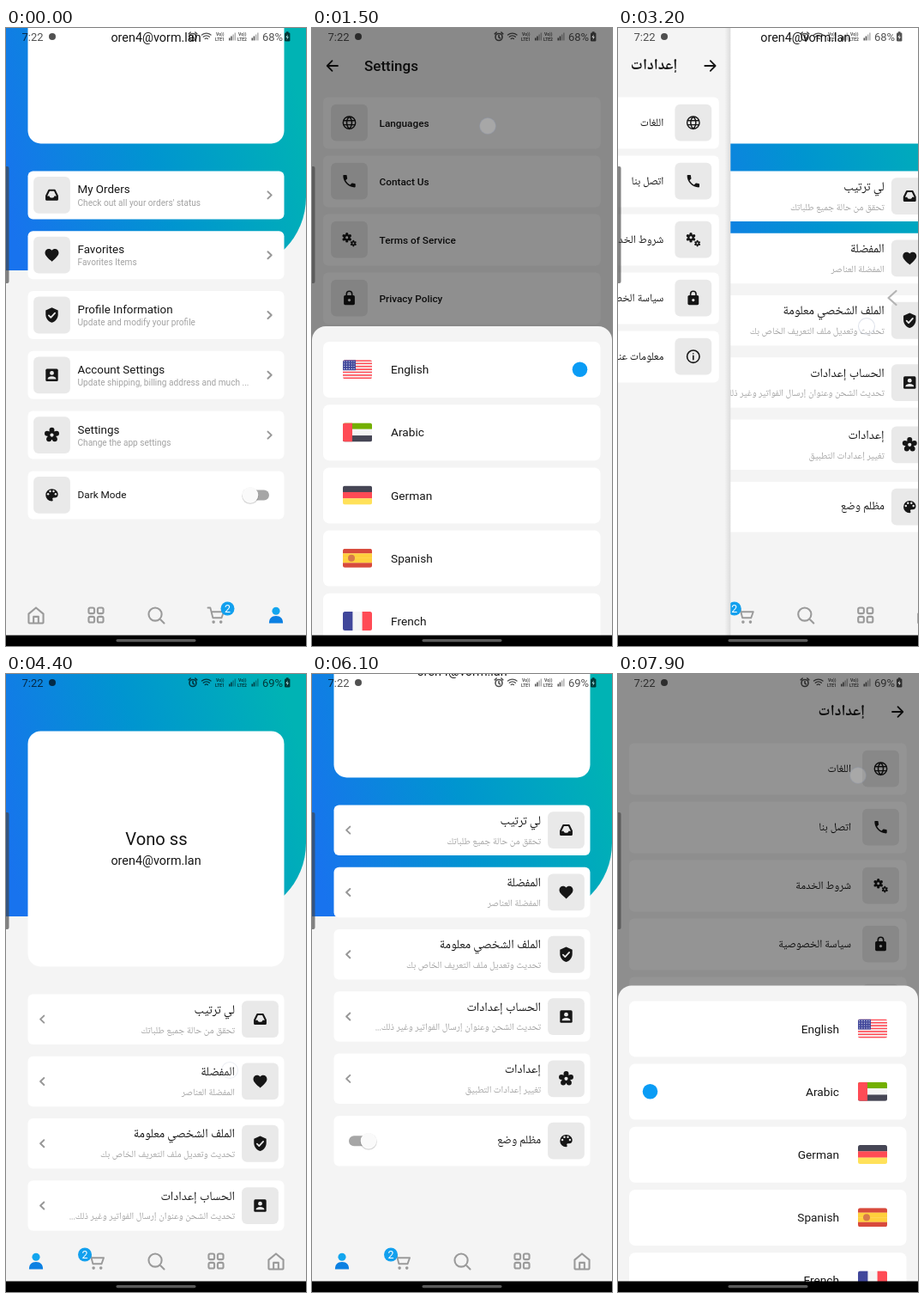
These frames come from a looping animation (350 by 719 pixels, 8 s). An HTML page:

```html
<!DOCTYPE html>
<html lang="en">
<head>
<meta charset="utf-8">
<title>Settings and language switch</title>
<style>
html, body { margin: 0; width: 100%; height: 100%; overflow: hidden; background: #f4f4f4; }
svg { display: block; width: 100%; height: 100%; }
text { font-family: Roboto, "Noto Sans", sans-serif; }
text.ar { font-family: "Noto Naskh Arabic UI", "Noto Naskh Arabic", "Noto Sans Arabic", "DejaVu Sans", sans-serif; direction: rtl; }
</style>
</head>
<body>
<svg id="stage" viewBox="0 0 350 719"></svg>
<script>
const LOOP = 8000, STEP = 100;
const BG = '#f4f4f4', TILE = '#e9e9e9', INK = '#161616', MUTED = '#a3a3a3', ACCENT = '#0a9cf5';

// ---------- drawing helpers ----------
const box = (x, y, w, h, r, fill, extra = '') =>
  `<rect x="${x}" y="${y}" width="${w}" height="${h}" rx="${r}" fill="${fill}" ${extra}/>`;
const disc = (x, y, r, fill, extra = '') => `<circle cx="${x}" cy="${y}" r="${r}" fill="${fill}" ${extra}/>`;
const path = (d, extra = '') => `<path d="${d}" ${extra}/>`;
const line = (d, w, color = 'currentColor') =>
  path(d, `fill="none" stroke="${color}" stroke-width="${w}" stroke-linecap="round" stroke-linejoin="round"`);
const group = (inner, attrs = '') => `<g ${attrs}>${inner}</g>`;
const at = (x, y, inner, s = 1) => group(inner, `transform="translate(${x} ${y}) scale(${s})"`);
const text = (x, y, s, size, fill = INK, extra = '') =>
  `<text x="${x}" y="${y}" font-size="${size}" fill="${fill}" ${extra}>${s}</text>`;
const arabic = (x, y, s, size, fill = INK, extra = '') => text(x, y, s, size, fill, `class="ar" ${extra}`);

const gear = (x, y, r, teeth, tooth) => {
  let s = '';
  for (let i = 0; i < teeth; i++) {
    const a = i * 2 * Math.PI / teeth - Math.PI / 2;
    s += disc(x + Math.cos(a) * r, y + Math.sin(a) * r, r * tooth, 'currentColor');
  }
  return s + disc(x, y, r * .92, 'currentColor') + disc(x, y, r * .36, TILE);
};

// icons live in a 24 x 24 box
const icons = {
  home: line('M3 10.5 12 3l9 7.5V21a1 1 0 0 1-1 1H4a1 1 0 0 1-1-1ZM9 22v-8h6v8', 2.2),
  grid: [[3, 3], [14, 3], [3, 14], [14, 14]].map(([x, y]) =>
    box(x, y, 7, 7, 2, 'none', 'stroke="currentColor" stroke-width="2.2"')).join(''),
  search: line('M19 11a8 8 0 1 1-16 0 8 8 0 0 1 16 0ZM17 17l5 5', 2.2),
  cart: line('M2 3h3l3.2 12.5h10.6L21.5 8H6.6', 2) + disc(9, 20.5, 1.9, 'currentColor') + disc(18, 20.5, 1.9, 'currentColor'),
  person: disc(12, 7, 4.8, '#12a5ee') + path('M3.5 22c0-6 3-9 8.5-9s8.500 3 8.500 9Z', 'fill="#0b80e2"'),
  inbox: line('M8 5h8l4 8v5.500H4v-5.500Z', 2.6) +
    path('M4 13.500h4.500a3.500 2.500 0 0 0 7 0H20v5H4Z', 'fill="currentColor"'),
  heart: path('M12 21.35l-1.45-1.32C5.4 15.36 2 12.28 2 8.5 2 5.42 4.42 3 7.5 3c1.74 0 3.41.81 4.5 2.09C13.09 3.81 14.76 3 16.5 3 19.58 3 22 5.42 22 8.5c0 3.78-3.4 6.86-8.55 11.54Z', 'fill="currentColor"'),
  shield: path('M12 1 3 5v6c0 5.500 3.800 10.700 9 12 5.200-1.300 9-6.500 9-12V5Z', 'fill="currentColor"') +
    line('M7.500 12.500l3 3 6-6.500', 2.2, TILE),
  account: box(3, 3, 18, 18, 2, 'currentColor') + disc(12, 9, 3, TILE) +
    path('M6 18v-1c0-2 4-3.100 6-3.100s6 1.100 6 3.100v1Z', `fill="${TILE}"`),
  gear: gear(12, 12, 7.2, 5, .52),
  palette: path('M12 3a9 9 0 1 0 0 18 1.600 1.600 0 0 0 1.200-2.600 1.500 1.500 0 0 1 1.100-2.400H16a5 5 0 0 0 5-5C21 6.600 17 3 12 3Z', 'fill="currentColor"') +
    [[6.5, 10.5], [9.5, 6.5], [14.5, 6.5], [17.5, 10.5]].map(p => disc(...p, 1.5, TILE)).join(''),
  globe: line('M21 12a9 9 0 1 1-18 0 9 9 0 0 1 18 0ZM3.500 9h17M3.500 15h17M12 3c-5 5-5 13 0 18 5-5 5-13 0-18Z', 1.8),
  phone: path('M6.62 10.79c1.44 2.83 3.76 5.14 6.59 6.59l2.2-2.2c.27-.27.67-.36 1.02-.24 1.12.37 2.33.57 3.57.57.55 0 1 .45 1 1V20c0 .55-.45 1-1 1-9.39 0-17-7.61-17-17 0-.55.45-1 1-1h3.5c.55 0 1 .45 1 1 0 1.25.2 2.45.57 3.57.11.35.03.74-.25 1.02Z', 'fill="currentColor"'),
  gears: gear(8.5, 9, 5.2, 6, .4) + gear(18, 17.5, 3.4, 6, .4),
  lock: box(4, 8, 16, 14, 2, 'currentColor') + line('M8 9V6a4 4 0 0 1 8 0v3', 2) + disc(12, 15, 2, TILE),
  info: line('M21 12a9 9 0 1 1-18 0 9 9 0 0 1 18 0ZM12 11v5.500M12 7.600v.1', 2)
};
const icon = (name, x, y, s, color = INK) =>
  group(icons[name], `transform="translate(${x - 12 * s} ${y - 12 * s}) scale(${s})" color="${color}"`);
const tile = (name, x, y, s) => box(x - 21.4, y - 21.4, 42.8, 42.8, 6, TILE) + icon(name, x, y, s);

const stripes = colors => colors.map((c, i) => box(0, i * 22 / colors.length, 34, 22 / colors.length + .1, 0, c)).join('');
const RED = '#ff4b55', DARK = '#464655', NAVY = '#41479b', WHITE = '#f5f5f5';
const flags = [
  stripes(Array.from({ length: 13 }, (_, i) => i % 2 ? WHITE : RED)) + box(0, 0, 15, 12, 0, NAVY) +
    Array.from({ length: 20 }, (_, i) => disc(1.8 + i % 5 * 2.8, 1.8 + (i / 5 | 0) * 2.8, .6, WHITE)).join(''),
  stripes(['#73af00', WHITE, DARK]) + box(0, 0, 11, 22, 0, RED),
  stripes([DARK, RED, '#ffe15a']),
  stripes(['#d84a3c', '#ffcf3c', '#ffcf3c', '#d84a3c']) + disc(10, 11, 4, '#d8794a'),
  box(0, 0, 34, 22, 0, WHITE) + box(0, 0, 11.4, 22, 0, NAVY) + box(22.6, 0, 11.4, 22, 0, RED)
];

// ---------- content ----------
const profileRows = [
  ['inbox', 'My Orders', "Check out all your orders' status", 'لي ترتيب', 'تحقق من حالة جميع طلباتك'],
  ['heart', 'Favorites', 'Favorites Items', 'المفضلة', 'المفضلة العناصر'],
  ['shield', 'Profile Information', 'Update and modify your profile', 'الملف الشخصي معلومة', 'تحديث وتعديل ملف التعريف الخاص بك'],
  ['account', 'Account Settings', 'Update shipping, billing address and much ...', 'الحساب إعدادات', 'تحديث الشحن وعنوان إرسال الفواتير وغير ذلك...'],
  ['gear', 'Settings', 'Change the app settings', 'إعدادات', 'تغيير إعدادات التطبيق'],
  ['palette', 'Dark Mode', '', 'مظلم وضع', '']
];
const settingRows = [
  ['globe', 'Languages', 'اللغات'],
  ['phone', 'Contact Us', 'اتصل بنا'],
  ['gears', 'Terms of Service', 'شروط الخدمة'],
  ['lock', 'Privacy Policy', 'سياسة الخصوصية'],
  ['info', 'About Us', 'معلومات عنا']
];
const languages = ['English', 'Arabic', 'German', 'Spanish', 'French'];

function profileRow([name, en, enSub, ar, arSub], i, rtl) {
  const h = rtl ? 58.5 : 56, mid = h / 2;
  let s = box(25.5, 0, 299, h, 6, '#fff') + tile(name, rtl ? 296.5 : 53.5, mid, .8);
  if (enSub) {
    s += rtl ? arabic(267, 22.3, ar, 14.6) + arabic(267, 45.2, arSub, 11.2, MUTED)
             : text(83.5, 26, en, 13.4) + text(83.5, 40.3, enSub, 10.1, MUTED);
    s += rtl ? line(`M44.300 ${mid - 4}l-4.200 4 4.200 4`, 2, '#989898')
             : line(`M305.500 ${mid - 4}l4.200 4-4.200 4`, 2, '#989898');
  } else {
    s += rtl ? arabic(267, 32, ar, 13.4) : text(83.5, 32, en, 11.8);
    s += box(rtl ? 43 : 279, mid - 6, 28, 12, 6, '#a6a6a6') +
      disc(rtl ? 66 : 285, mid + .8, 9.8, '#000', 'opacity=".16"') + disc(rtl ? 66 : 285, mid, 9.3, '#fafafa');
  }
  return at(0, 372.4 + i * (rtl ? 72.3 : 69.8), s);
}

function navBar(rtl) {
  const items = ['home', 'grid', 'search', 'cart', 'person'];
  const px = i => rtl ? 315 - i * 70 : 35 + i * 70;
  return box(0, 661, 350, 46, 0, BG) +
    items.map((n, i) => icon(n, px(i), 683, .95, '#9a9a9a')).join('') +
    disc(rtl ? 92 : 258.5, 675.5, 8, '#12a0ee') +
    text(rtl ? 92 : 258.5, 680, '2', 12.5, '#fff', 'text-anchor="middle"');
}

function profilePage(rtl) {
  const list = box(25.5, 66.4, 299, 274, 15, '#fff') +
    text(175.5, 199, 'Vono ss', 20.2, INK, 'text-anchor="middle"') +
    text(175, 222, 'oren4@vorm.lan', 14.4, INK, 'text-anchor="middle"') +
    profileRows.map((r, i) => profileRow(r, i, rtl)).join('');
  return box(0, 0, 350, 707, 0, BG) +
    path('M0 0H350V197a85 85 0 0 1-85 85H0Z', 'fill="url(#sky)"') +
    group(group(list, 'data-part="list"'), 'clip-path="url(#above)"') + navBar(rtl);
}

function settingsPage(rtl) {
  const edge = rtl ? box(343, 0, 7, 707, 0, 'url(#shadeR)') : box(0, 0, 7, 707, 0, 'url(#shadeL)');
  const head = rtl
    ? line('M320 44h12M326.500 38.200l5.800 5.800-5.800 5.800', 1.8, INK) + arabic(288, 47.5, 'إعدادات', 17.6, INK, 'font-weight="600"')
    : line('M30 44H18M23.500 38.200l-5.800 5.800 5.800 5.800', 1.8, INK) + text(61, 50, 'Settings', 17, INK, 'font-weight="500"');
  const rows = settingRows.map(([name, en, ar], i) => at(0, 80.5 + i * 68,
    box(13, 0, 323.5, 60, 6, '#fff') + tile(name, rtl ? 306.5 : 43.5, 29.7, .8) +
    (rtl ? arabic(272, 33, ar, 12.9, INK, 'font-weight="500"') : text(78.5, 34.3, en, 11.8, INK, 'font-weight="500"')))).join('');
  return box(0, 0, 350, 707, 0, BG) + head + rows + group(edge, 'data-part="edge"');
}

function sheet(rtl) {
  return path('M0 360V16A16 16 0 0 1 16 0H334A16 16 0 0 1 350 16V360Z', `fill="${BG}"`) +
    languages.map((name, i) => at(0, 18 + i * 73.2,
      box(13, 0, 323.5, 65, 7, '#fff') +
      at(rtl ? 280 : 36, 21.2, group(flags[i], 'clip-path="url(#flag)"')) +
      text(rtl ? 258 : 92, 37.2, name, 13.7, INK, rtl ? 'text-anchor="end"' : ''))).join('') +
    disc(rtl ? 37.5 : 312.5, rtl ? 123.4 : 50.2, 8.8, ACCENT);
}

function statusBar() {
  const c = '#000';
  const bars = x => [3, 5, 7, 9].map((h, i) => box(x + i * 2.2, 14.5 - h, 1.5, h, 0, c, i > 1 ? 'opacity=".45"' : '')).join('');
  const lte = (x, n) => text(x, 9, 'Vo))', 5, c, 'font-weight="700"') + text(x - 1, 14.5, 'LTE' + n, 5, c, 'font-weight="700"');
  return group(text(18.5, 14.7, '7:22', 13, c) + disc(54, 10, 4, c) +
    line('M222 10.500a4 4 0 1 1-8 0 4 4 0 0 1 8 0ZM218 8.500v2.300l1.500 1M213.200 6.800l2-1.800M222.800 6.800l-2-1.800', 1.6, c) +
    line('M228.500 8a8 8 0 0 1 10.500 0M230.300 10.300a5.200 5.200 0 0 1 7 0M232.200 12.500a2.500 2.500 0 0 1 3.200 0', 1.3, c) +
    lte(245, 1) + bars(260) + lte(271, 2) + bars(286.5) +
    `<text id="level" x="299" y="14.700" font-size="13" fill="${c}"></text>` +
    box(325, 5.5, 6.4, 10, 1.2, c) + box(326.8, 4.2, 2.8, 2, .4, c) +
    path('M328.700 7.500l-2.300 3.500h1.600l-.4 2.800 2.300-3.600h-1.600Z', 'fill="#eee"'), 'opacity=".68"');
}

const shade = (id, x1, x2) => `<linearGradient id="${id}" x1="${x1}" x2="${x2}"><stop stop-opacity=".1"/><stop offset="1" stop-opacity="0"/></linearGradient>`;
const defs = `<defs>
  <linearGradient id="sky" gradientUnits="userSpaceOnUse" x1="0" y1="210" x2="350" y2="110">
    <stop stop-color="#1873ee"/><stop offset=".5" stop-color="#0095d0"/><stop offset="1" stop-color="#00b3b4"/>
  </linearGradient>${shade('shadeR', 1, 0)}${shade('shadeL', 0, 1)}
  <clipPath id="above"><rect width="350" height="661"/></clipPath>
  <clipPath id="flag"><rect width="34" height="22" rx="2.500"/></clipPath></defs>`;

const scene = rtl =>
  group(profilePage(rtl), 'data-part="profile"') +
  group(settingsPage(rtl), 'data-part="settings"') +
  box(0, 0, 350, 707, 0, '#000', 'data-part="scrim"');

const stage = document.getElementById('stage');
stage.innerHTML = defs + [false, true].map(rtl => group(scene(rtl), `id="scene${+rtl}"`)).join('') +
  statusBar() +
  [false, true].map(rtl => group(sheet(rtl), `id="sheet${+rtl}"`)).join('') +
  path('M0 161h1.500a2 2 0 0 1 2 2v132a2 2 0 0 1-2 2H0Z', 'fill="#444" opacity=".65"') +
  group(line('M324.500 306l-9 8 9 8', 2.2, '#b4b4b4'), 'id="back"') +
  disc(0, 0, 9.5, '#fff', 'id="touch" fill-opacity=".4" stroke="#8a97b8" stroke-opacity=".5" stroke-width="1.100"') +
  box(0, 706.5, 350, 13, 0, '#000') + box(128.5, 711, 93, 3.2, 1.6, '#5a5a5a');

const $ = id => document.getElementById(id);
const views = [0, 1].map(i => {
  const part = n => $('scene' + i).querySelector(`[data-part="${n}"]`);
  return {
    root: $('scene' + i), sheet: $('sheet' + i), profile: part('profile'),
    settings: part('settings'), edge: part('edge'), scrim: part('scrim'), list: part('list')
  };
});

// ---------- motion ----------
const clamp = v => Math.max(0, Math.min(1, v));
const ramp = (t, start, dur) => clamp((t - start) / dur);

function bezier(x1, y1, x2, y2) {
  const f = (a, b, s) => 3 * a * s * (1 - s) ** 2 + 3 * b * s * s * (1 - s) + s ** 3;
  return p => {
    if (p <= 0 || p >= 1) return clamp(p);
    let lo = 0, hi = 1;
    for (let i = 0; i < 24; i++) {
      const m = (lo + hi) / 2;
      if (f(x1, x2, m) < p) lo = m; else hi = m;
    }
    return f(y1, y2, lo);
  };
}
const slide = bezier(.35, .91, .33, .97), rise = bezier(0, 0, .2, 1);

// keys: [time, value, value...]
function track(keys, t) {
  if (t <= keys[0][0]) return keys[0].slice(1);
  for (let i = 1; i < keys.length; i++) {
    const a = keys[i - 1], b = keys[i];
    if (t <= b[0]) return a.slice(1).map((v, j) => v + (b[j + 1] - v) * (t - a[0]) / (b[0] - a[0]));
  }
  return keys[keys.length - 1].slice(1);
}
const scrollKeys = [[3750, 206], [4000, 95], [4150, 30], [4300, 0], [4650, 0], [5400, 129], [5700, 190], [5850, 212], [6000, 220]];
const taps = [
  [[200, 205, 475], [400, 205, 475]],
  [[1200, 205, 114], [1400, 205, 114]],
  [[1900, 250, 472], [2100, 250, 472]],
  [[2900, 346, 342], [3100, 290, 347]],
  [[3750, 275, 255], [4000, 268, 366], [4250, 261, 461]],
  [[4600, 263, 505], [4650, 263, 505], [5400, 260, 376], [5700, 258, 315]],
  [[6300, 205, 460], [6500, 205, 460]],
  [[7600, 280, 118], [7780, 280, 118]]
];
const FADE = 220;

const settingsShown = t =>
  t < 3075 ? slide(ramp(t, 420, 500)) : t < 6000 ? 1 - slide(ramp(t, 3075, 500)) : slide(ramp(t, 6680, 500));
const sheetShown = t =>
  t < 2200 ? rise(ramp(t, 1240, 250)) : t < 7000 ? 1 - rise(ramp(t, 2250, 200)) : rise(ramp(t, 7718, 250));

const move = (el, x, y) => el.setAttribute('transform', `translate(${x.toFixed(2)} ${y.toFixed(2)})`);
const show = (el, on) => el.setAttribute('display', on ? 'inline' : 'none');

function draw(t) {
  const rtl = +(t >= 2150), dir = rtl ? -1 : 1, v = views[rtl];
  views.forEach((o, i) => { show(o.root, i === rtl); show(o.sheet, i === rtl); });

  const open = settingsShown(t), up = sheetShown(t);
  move(v.list, 0, -track(scrollKeys, t)[0]);
  move(v.profile, -dir * open * 350 / 3, 0);
  move(v.settings, dir * (1 - open) * 350, 0);
  show(v.settings, open > 0);
  show(v.edge, open < 1);
  v.scrim.setAttribute('opacity', .44 * up);
  move(v.sheet, 0, 347 + (1 - up) * 360);
  show(v.sheet, up > 0);
  $('level').textContent = t < 3600 ? '68%' : '69%';

  const pull = ramp(t, 2900, 200);
  move($('back'), (1 - pull) * 30, 0);
  $('back').setAttribute('opacity', pull * (1 - ramp(t, 3200, 150)));

  const tap = taps.find(k => t >= k[0][0] && t < k[k.length - 1][0] + FADE);
  show($('touch'), !!tap);
  if (tap) {
    const [x, y] = track(tap, t);
    move($('touch'), x, y);
    $('touch').setAttribute('opacity', 1 - ramp(t, tap[tap.length - 1][0], FADE));
  }
}

const start = performance.now();
function tick() {
  const t = (performance.now() - start) % LOOP;
  draw(Math.floor(t / STEP) * STEP);
  requestAnimationFrame(tick);
}
tick();
</script>
</body>
</html>
```
